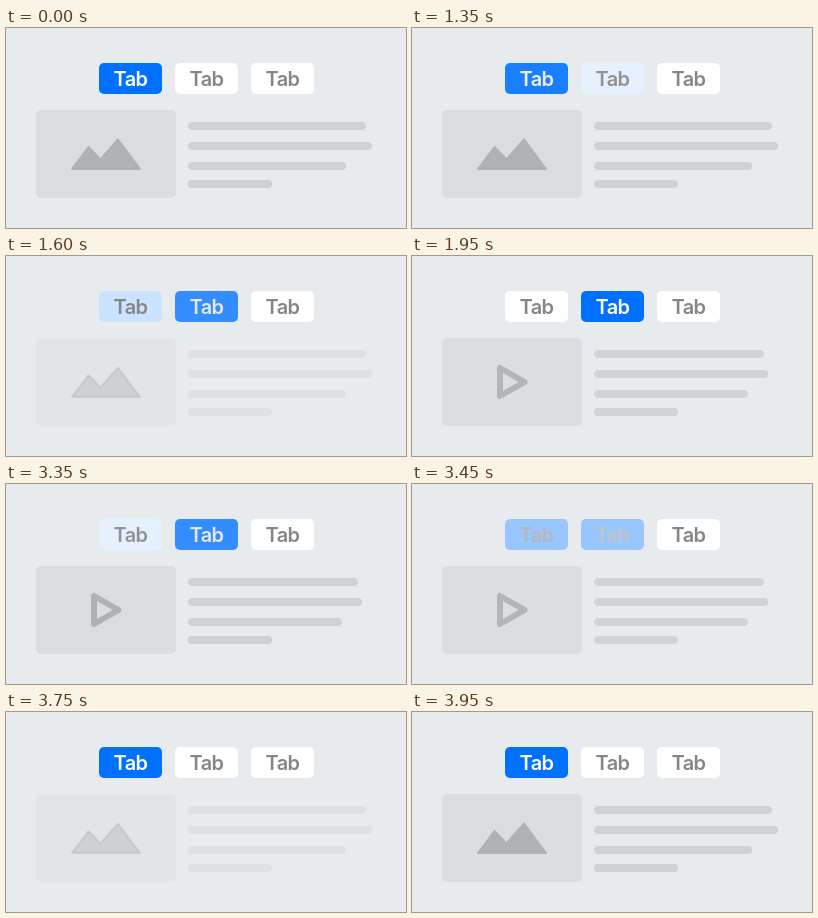
Animation of 400 by 200 pixels, one loop 4000 ms. Source, as an HTML page:

```html
<!DOCTYPE html>
<html lang="en">
<head>
<meta charset="utf-8">
<title>Tabs</title>
<style>
  html, body { margin: 0; width: 100%; height: 100%; overflow: hidden; background: #e7ebee; }
  svg { display: block; width: 100%; height: 100%; }
  .tab { fill: #fff; }
  .label { font: 600 20px Inter, "Liberation Sans", sans-serif; letter-spacing: -.03em; text-anchor: middle; fill: #868686; }
  .card { fill: #dadddf; }
  .line { fill: #cfd2d5; }
  .hill { fill: #b0b1b3; stroke: #b0b1b3; stroke-width: 2; stroke-linejoin: round; }
  .play { fill: none; stroke: #b0b1b3; stroke-width: 6; stroke-linejoin: round; }
</style>
</head>
<body>
<svg viewBox="0 0 400 200">
  <g id="tabs"></g>
  <g id="image"><path class="hill" d="M66 141L82.5 119L94.5 131.5L112 111.5L134 141Z"/></g>
  <g id="video"><path class="play" d="M88 112V140L112.5 126Z"/></g>
</svg>
<script>
const LOOP = 4000, FRAME = 1000 / 30;
const GRAY = [134, 134, 134], WHITE = [255, 255, 255], BLUE = [0, 113, 255];
const $ = id => document.getElementById(id);

function add(parent, tag, attrs) {
  const el = document.createElementNS("http://www.w3.org/2000/svg", tag);
  for (const k in attrs) el.setAttribute(k, attrs[k]);
  return parent.appendChild(el);
}

const tabs = [93, 169, 245].map(x => {
  const box = add($("tabs"), "rect", { class: "tab", x, y: 35, width: 63, height: 31, rx: 5 });
  const label = add($("tabs"), "text", { class: "label", x: x + 31.5, y: 58 });
  label.textContent = "Tab";
  return { box, label };
});

function buildPanel(id, ends) {
  const group = $(id), icon = group.firstElementChild;
  add(group, "rect", { class: "card", x: 30, y: 82, width: 140, height: 88, rx: 5 });
  ends.forEach((end, i) => add(group, "rect", {
    class: "line", x: 182, y: [94, 114, 134, 152][i], width: end - 182, height: 8, rx: 4
  }));
  group.appendChild(icon);
  return group;
}
const image = buildPanel("image", [360, 366, 340, 266]);
const video = buildPanel("video", [352, 356, 336, 266]);

// Ramps in 30 fps steps after each switch: [start, end]
const SWITCHES = [
  { at: 1350, offBox: [-1, 9], offText: [-1, 6], onBox: [-1, 9], onText: [-1, 9], out: [1, 11], in: [9, 19] },
  { at: 3350, offBox: [-1.5, 6], offText: [-2, 8], onBox: [-1, 9], onText: [-1, 9], out: [2, 12], in: [8, 18] }
];

const ramp = (n, [a, b]) => Math.min(1, Math.max(0, (n - a) / (b - a)));
const mix = (a, b, p) => `rgb(${a.map((v, i) => Math.round(v + (b[i] - v) * p))})`;

function paintTab({ box, label }, boxOn, textOn) {
  box.style.fill = mix(WHITE, BLUE, boxOn);
  label.style.fill = mix(GRAY, WHITE, textOn);
}

// Opacity goes to each shape, so overlapping fill and stroke add up
function fade(group, p) {
  group.setAttribute("fill-opacity", p);
  group.setAttribute("stroke-opacity", p);
}

function draw(t) {
  const back = t < SWITCHES[0].at || t >= SWITCHES[1].at;
  const s = SWITCHES[back ? 1 : 0];
  const n = t < SWITCHES[0].at ? 99 : Math.floor((t - s.at) / FRAME + 1e-6);
  const [on, off] = back ? [tabs[0], tabs[1]] : [tabs[1], tabs[0]];
  const [shown, hidden] = back ? [image, video] : [video, image];
  paintTab(on, ramp(n, s.onBox), ramp(n, s.onText));
  paintTab(off, 1 - ramp(n, s.offBox), 1 - ramp(n, s.offText));
  fade(shown, ramp(n, s.in));
  fade(hidden, 1 - ramp(n, s.out));
}

const start = performance.now();
function tick() {
  draw((performance.now() - start) % LOOP);
  requestAnimationFrame(tick);
}
tick();
</script>
</body>
</html>
```
